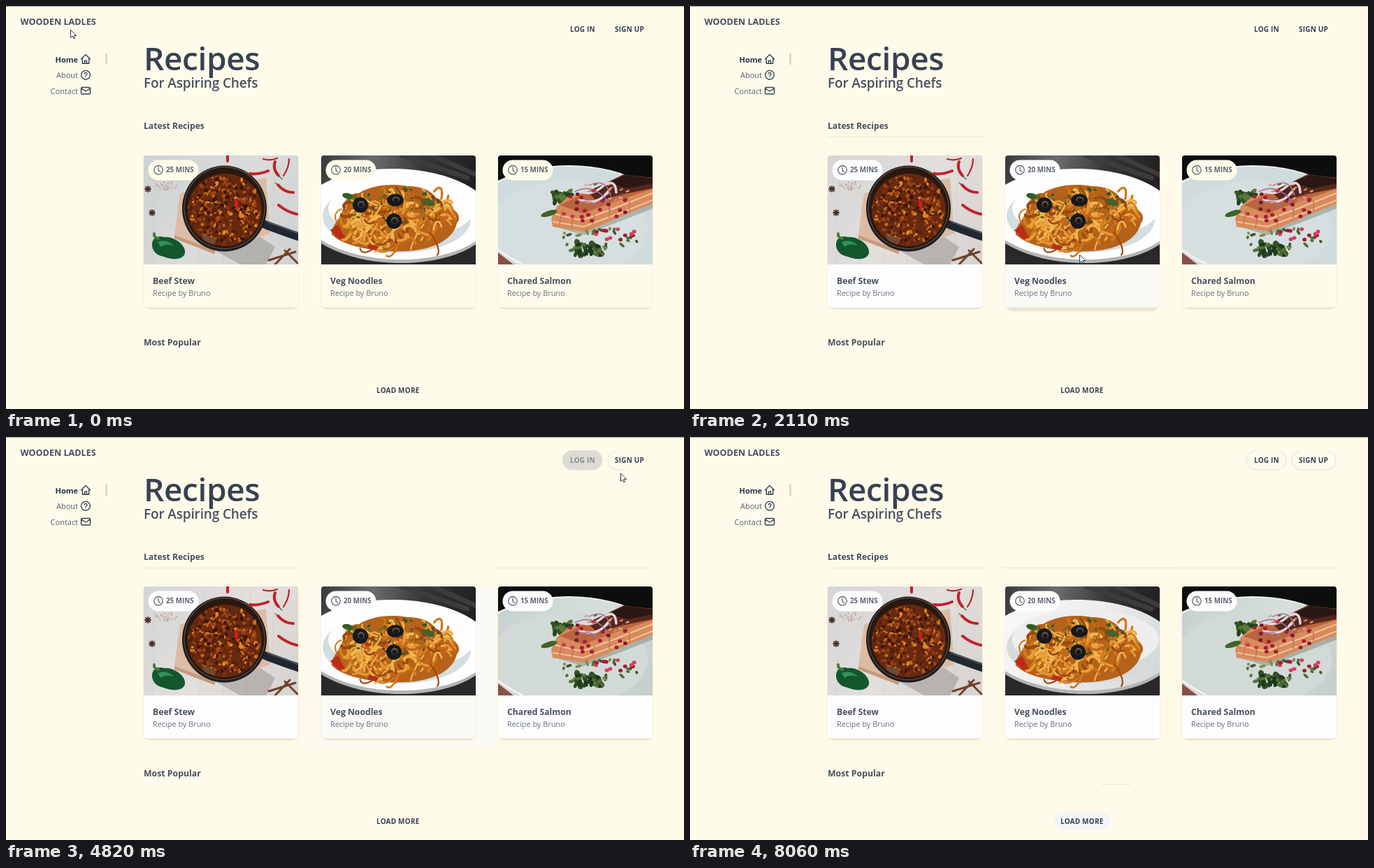
Animation of 970x577 px, one loop 8.61 s. Source, as an HTML page with a canvas:

```html
<!DOCTYPE html>
<html lang="en">
<head>
<meta charset="utf-8">
<title>Recipes</title>
<style>
html, body { margin: 0; width: 100%; height: 100%; overflow: hidden; background: #fffbeb; }
canvas { display: block; }
</style>
</head>
<body>
<canvas id="stage" width="970" height="577"></canvas>
<script>
const LOOP = 8610;
const PAGE = '#fffbeb', INK = '#374151', SOFT = '#5b6472', HEADING = '#465060';
const PHOTO_W = 221, PHOTO_H = 156, CARD_Y = 214, CARD_H = 218;
const stage = document.getElementById('stage').getContext('2d');

// ---- drawing helpers ----
function fill(g, color, path) {
  g.fillStyle = color;
  g.fill(new Path2D(path));
}

function line(g, color, width, path) {
  g.strokeStyle = color;
  g.lineWidth = width;
  g.lineCap = g.lineJoin = 'round';
  g.stroke(new Path2D(path));
}

function blob(g, color, x, y, rx, ry = rx, turn = 0) {
  g.fillStyle = color;
  g.beginPath();
  g.ellipse(x, y, rx, ry, turn, 0, Math.PI * 2);
  g.fill();
}

function ring(g, color, width, x, y, r) {
  g.strokeStyle = color;
  g.lineWidth = width;
  g.beginPath();
  g.arc(x, y, r, 0, Math.PI * 2);
  g.stroke();
}

function box(g, color, x, y, w, h, r = 0) {
  g.fillStyle = color;
  g.beginPath();
  g.roundRect(x, y, w, h, r);
  g.fill();
}

function text(str, x, y, size, weight = 600, color = INK, { spacing = 0, align = 'left' } = {}) {
  stage.font = `${weight} ${size}px "Open Sans", "Noto Sans", sans-serif`;
  stage.letterSpacing = spacing + 'px';
  stage.textAlign = align;
  stage.fillStyle = color;
  stage.fillText(str, x, y);
}

function shade(g, x0, y0, x1, y1, ...colors) {
  const gradient = g.createLinearGradient(x0, y0, x1, y1);
  colors.forEach((c, i) => gradient.addColorStop(i / (colors.length - 1), c));
  return gradient;
}

function seeded(seed) {
  return () => (seed = (seed * 16807) % 2147483647) / 2147483647;
}

function scatter(count, cx, cy, rx, ry, random, draw) {
  for (let i = 0; i < count; i++) {
    const a = random() * Math.PI * 2, d = Math.sqrt(random());
    draw(cx + Math.cos(a) * d * rx, cy + Math.sin(a) * d * ry);
  }
}

// ---- photos, in stage coordinates ----
function stew(g, fine) {
  const random = seeded(41), pick = list => list[Math.floor(random() * list.length)];
  g.fillStyle = fine ? shade(g, 197, 214, 418, 370, '#d5d5d4', '#e2dfdd', '#d5d2cf')
                     : shade(g, 197, 214, 418, 370, '#cdd2d2', '#dadbda', '#cfd2d1');
  g.fillRect(197, 214, 221, 156);
  for (let x = 214; x < 418; x += 34) line(g, 'rgba(190,190,188,.3)', 1, `M${x} 214L${x - 5} 370`);
  fill(g, 'rgba(130,122,116,.4)', 'M290 345L335 370H372L385 345L360 328Z');
  fill(g, '#dcbba3', 'M249 268L372 246L378 326L300 350L241 328Z');
  fill(g, '#c69a7b', 'M241 328L300 350L298 355L241 333Z');
  line(g, '#20272e', 12, 'M371 313C387 319 400 324 424 332');
  line(g, '#4b555e', 2, 'M374 309C390 315 402 319 422 327');
  blob(g, '#1e1d1e', 312.5, 290, 60.5, 61.5);
  blob(g, '#5e5853', 312.5, 289, 58, 59);
  blob(g, '#2a1710', 312.5, 289, 57, 58);
  blob(g, '#66290f', 313, 292, 53, 52);
  scatter(330, 313, 292, 51, 50, random, (x, y) =>
    blob(g, pick(['#43190f', '#7d3013', '#a84817', '#e0881f', '#54200f', '#96401a', '#3a140c', '#c96a1a']),
      x, y, 1.3 + random() * 2.6, 1.2 + random() * 1.6, random() * 3));
  line(g, '#d51d1a', 3.5, 'M328 278Q331 284 330 290');
  blob(g, '#6d4a37', 290, 334, 10, 4.5, .4);
  fill(g, '#14572f', 'M209 343C208 331 219 328 226 331C238 329 258 341 256 354C253 365 235 363 226 359C215 357 210 351 209 343Z');
  fill(g, '#31935a', 'M217 338Q230 333 240 343Q228 339 221 345Z');
  line(g, '#477d35', 4, 'M218 333Q211 331 212 326');
  line(g, '#c0222a', 4, 'M349 240Q360 242 375 236M385 223Q381 233 390 243M389 256Q398 267 411 267M390 285Q402 295 416 298M317 214L317 222');
  line(g, '#b5252b', 2.2, 'M397 243Q405 231 405 219M368 219Q378 222 388 218');
  line(g, '#5d7541', 1.5, 'M346 239l-5 -3M390 243l5 5M385 253l4 3');
  line(g, '#70412d', 3, 'M376 364L414 352M385 370L406 348M399 350L417 368');
  for (const [x, y] of [[203, 262], [209, 296]])
    line(g, '#4b302a', 1.8, `M${x - 4} ${y}h8M${x} ${y - 4}v8M${x - 3} ${y - 3}l6 6M${x + 3} ${y - 3}l-6 6`);
  scatter(45, 230, 257, 17, 7, random, (x, y) => blob(g, '#b99384', x, y, .8));
}

function noodles(g, fine) {
  const random = seeded(77), pick = list => list[Math.floor(random() * list.length)];
  g.fillStyle = shade(g, 451, 214, 672, 240, '#3a3a3a', '#6c6c6b', '#353535', '#202020');
  g.fillRect(451, 214, 221, 156);
  fill(g, '#292929', 'M451 335H672V370H451Z');
  line(g, '#3c3c3c', 7, 'M610 214L680 245M566 214L660 246');
  blob(g, '#b2b4b5', 559, 302, 136, 66, .03);
  blob(g, fine ? shade(g, 451, 235, 672, 365, '#f9f9f9', '#ececed', '#d2d4d6') : '#fefefe', 559, 298, 136, 65, .03);
  blob(g, fine ? '#d7dadb' : '#d4dddf', 559, 303, 106, 50, .03);
  blob(g, fine ? '#eeeeee' : '#fdfdfd', 566, 290, 105, 43);
  fill(g, '#b5621a', 'M466 327C465 314 480 304 482 290C484 278 492 267 505 268C520 258 548 253 574 258C600 258 615 268 618 282C640 286 655 300 645 311C640 334 612 349 572 351C537 353 484 346 466 327Z');
  const tones = ['#e9a036', '#d17a1c', '#f0b850', '#99490f', '#c2671a', '#e3983a', '#f0ae48'];
  scatter(170, 558, 307, 78, 38, random, (x, y) => {
    const start = random() * 6;
    g.strokeStyle = pick(tones);
    g.lineWidth = 2 + random() * 2.4;
    g.beginPath();
    g.ellipse(x, y, 8 + random() * 16, 4 + random() * 8, random() * 3, start, start + 2);
    g.stroke();
  });
  fill(g, '#bb2b18', 'M464 321L475 313L485 332L477 334Z');
  fill(g, '#b92e17', 'M520 341l14 3l-5 6l-12 -3Z');
  scatter(44, 552, 284, 70, 28, random, (x, y) =>
    blob(g, pick(['#356024', '#4d752d', '#274d20']), x, y, 2.6, 1.3, random() * 3));
  blob(g, '#365c28', 489, 272, 8, 4, .2);
  blob(g, '#47622a', 604, 281, 10, 5, .3);
  for (const [x, y, rx, ry] of [[507, 285, 11, 11], [557, 278, 12, 9], [555, 308, 11, 11]]) {
    blob(g, '#17181b', x, y, rx, ry);
    blob(g, '#5c5856', x + 1, y - 1, rx * .45, ry * .45);
    blob(g, '#18181a', x + 1, y, rx * .32, ry * .32);
  }
}

function salmon(g, fine) {
  const random = seeded(29), pick = list => list[Math.floor(random() * list.length)];
  g.fillStyle = '#0c0e0d';
  g.fillRect(704, 214, 221, 156);
  blob(g, '#eef0ee', 805, 321, 156, 93);
  blob(g, fine ? shade(g, 704, 230, 925, 370, '#c5d0ce', '#d7dfdc', '#c2cecb') : '#cfdbdd', 807, 321, 154, 91);
  blob(g, fine ? '#d2dad7' : '#d6dfe0', 805, 318, 113, 67);
  fill(g, '#8a4f48', 'M704 353L726 370H704Z');
  line(g, '#f3f2ed', 3, 'M704 349Q720 361 738 369');
  fill(g, 'rgba(110,112,98,.4)', 'M785 316L826 328L890 304L925 290V283L850 300Z');
  scatter(26, 794, 272, 16, 11, random, (x, y) =>
    blob(g, pick(['#2f5325', '#5d7837', '#23421f']), x, y, 5, 3, random() * 3));

  // fish: flaky front, then the seared crust
  fill(g, '#d88b5c', 'M780 304L788 287L803 274L836 264L884 242L925 246V283L890 297L829 323L782 316Z');
  fill(g, '#b9653f', 'M792 285L836 264L884 242L925 246V262L868 281L826 297Z');
  fill(g, '#55271d', 'M832 266L884 241L925 246V261L880 270L846 280Z');
  fill(g, '#2b1714', 'M862 253L886 242L925 247V254L890 261Z');
  line(g, '#f3c39b', 2, 'M786 298L824 307L872 289L925 268M783 309L826 316L880 296L925 278');
  line(g, '#c4744c', 1.5, 'M796 292l-4 20M812 300l-3 17M842 299l-2 13M864 291l-1 12M892 280l0 13');
  scatter(24, 855, 268, 50, 16, random, (x, y) =>
    blob(g, pick(['#8c4029', '#e5a47a', '#3a1c17', '#c98a6b']), x, y, 3, 1.3, -.4));

  line(g, '#e6d5df', 3.5, 'M818 263Q836 275 855 257Q872 246 873 267M821 277Q845 287 861 266');
  line(g, '#a377a0', 1.6, 'M814 266Q834 255 852 270Q866 282 862 292M834 257Q858 245 865 271M818 283Q834 275 846 287');
  blob(g, '#40632d', 777, 297, 12, 4, -.3);
  scatter(26, 850, 334, 62, 18, random, (x, y) =>
    blob(g, pick(['#547139', '#3c5a2e', '#7c8c50']), x, y, 2 + random() * 3, 2, random() * 3));
  line(g, '#34502a', 8, 'M817 338L822 357M838 340L852 355');
  scatter(30, 830, 350, 24, 11, random, (x, y) =>
    blob(g, pick(['#2c4924', '#547139', '#1f361c']), x, y, 4.5, 2.5, random() * 3));
  scatter(20, 839, 288, 54, 27, random, (x, y) => blob(g, pick(['#a31d36', '#d0304e', '#82192b']), x, y, 3, 2.6));
  scatter(12, 872, 326, 32, 9, random, (x, y) => blob(g, pick(['#a31d36', '#d83c5c']), x, y, 3, 2.6));
}

function photo(paint, x, fine) {
  const canvas = document.createElement('canvas');
  canvas.width = PHOTO_W;
  canvas.height = PHOTO_H;
  const g = canvas.getContext('2d');
  g.translate(-x, -CARD_Y);
  paint(g, fine);
  return canvas;
}

// "fresh" is the time from which a card is white and its photo smooth
const cards = [
  { x: 197, title: 'Beef Stew', mins: 25, paint: stew, tint: 930, fresh: 930, hovers: [[930, 1620]] },
  { x: 451, title: 'Veg Noodles', mins: 20, paint: noodles, tint: 1830, fresh: 5660, hovers: [[1830, 2300], [5660, 6000]] },
  { x: 704, title: 'Chared Salmon', mins: 15, paint: salmon, tint: 2350, fresh: 3230, hovers: [[2350, 3230]] },
];
for (const card of cards) card.photos = [false, true].map(fine => photo(card.paint, card.x, fine));

// ---- timing ----
const clamp = v => Math.max(0, Math.min(1, v));
const pulse = (t, from, to, fade = 240) => Math.min(clamp((t - from) / fade), 1 - clamp((t - to) / fade));

// Pointer moves: first step, last step, number of steps, end point, shape
const moves = [
  [0, 0, 1, 92, 34, 'arrow'], [120, 240, 2, 115, 28, 'arrow'], [390, 390, 1, 186, 20, 'arrow'],
  [540, 790, 3, 237, 168, 'arrow'], [930, 1410, 5, 375, 335, 'arrow'], [1560, 1560, 1, 426, 349, 'arrow'],
  [1680, 1680, 1, 463, 347, 'arrow'], [1830, 1830, 1, 505, 346, 'arrow'], [2110, 2590, 5, 763, 396, 'beam'],
  [2960, 2960, 1, 763, 392, 'beam'], [3080, 3080, 1, 770, 368, 'arrow'], [3230, 3830, 6, 821, 56, 'arrow'],
  [3980, 4340, 4, 826, 36, 'hand'], [4580, 4820, 3, 879, 52, 'arrow'], [4940, 5420, 5, 890, 36, 'hand'],
  [5540, 5900, 4, 618, 420, 'arrow'], [6050, 6170, 2, 607, 493, 'arrow'], [6320, 6320, 1, 589, 521, 'arrow'],
  [6470, 6470, 1, 573, 543, 'arrow'], [6620, 6890, 3, 568, 547, 'hand'], [7040, 7290, 3, 641, 562, 'arrow'],
  [7440, 7560, 2, 642, 580, 'arrow'],
];

function pointerAt(t) {
  const i = moves.findLastIndex(m => t >= m[0]);
  const [from, to, steps, x, y, shape] = moves[i];
  const [, , , px, py, before] = moves[Math.max(0, i - 1)];
  const gap = (to - from) / Math.max(1, steps - 1) || 1;
  const done = Math.min(steps, Math.floor((t - from) / gap + 1e-6) + 1) / steps;
  const kind = shape === 'arrow' || done === 1 ? shape : before === 'hand' ? 'hand' : 'arrow';
  return { x: Math.round(px + (x - px) * done), y: Math.round(py + (y - py) * done), kind };
}

// ---- page parts ----
function drawPointer(t) {
  const { x, y, kind } = pointerAt(t), g = stage;
  g.save();
  g.translate(x + .5, y + .5);
  if (kind === 'beam') {
    line(g, '#333', 1, 'M-3 -6H-1M1 -6H3M0 -5V5M-3 6H-1M1 6H3');
  } else {
    const path = kind === 'hand'
      ? 'M-1 0Q0 -2 1 0V5L6 6V11L4 14H-2L-5 9Q-5 6 -1 9Z'
      : 'M0 0V11L2.6 8.6L4.4 12.4L6 11.6L4.4 8H7.8Z';
    fill(g, '#fff', path);
    line(g, '#333942', 1, path);
  }
  g.restore();
}

function drawNav() {
  const g = stage, right = { align: 'right' };
  text('WOODEN LADLES', 20.5, 26.5, 12.6, 700, HEADING);
  text('Home', 103, 80.5, 11, 700, '#293241', right);
  text('About', 103, 103, 11, 400, '#566071', right);
  text('Contact', 103, 126, 11, 400, '#566071', right);
  line(g, INK, 1.4, 'M107.5 76L114 69.5L120.5 76M109.3 75V82.3H118.7V75M112.5 82V78.3H115.5V82');
  ring(g, INK, 1.4, 114, 98.8, 6.4);
  line(g, INK, 1.3, 'M112 97.2Q112.4 95.4 114 95.4Q116 95.5 116 97.2Q115.9 98.4 114.1 99.3V100M114 102v.1');
  line(g, INK, 1.4, 'M109 116.5H119Q120.5 116.5 120.5 118V124.5Q120.5 126 119 126H109Q107.5 126 107.5 124.5V118Q107.5 116.5 109 116.5M107.8 118L114 122L120.2 118');
  box(g, '#ead5cb', 142, 68, 3, 16);
}

function drawTints(t) {
  const g = stage;
  if (t >= 930) box(g, '#fefae8', 192, 169, 230, 274);
  if (t >= 2230) {
    box(g, '#fbf9f4', 446, 215, t < 3230 ? 484 : 254, 229);
    if (t >= 3230) box(g, '#fefae8', 700, 169, 226, 274);
  }
  if (t >= 5660) box(g, '#fefae8', 446, 188, 254, 255);
  const rule = '#ece8da';
  if (t >= 930) box(g, rule, 197, 187, 225, 1);
  if (t >= 3230) box(g, rule, 700, 187, 225, 1);
  if (t >= 5660) box(g, rule, 446, 187, 254, 1);
  if (t >= 6170) box(g, rule, 588, 497, 43, 1);
}

function drawCard(card, t) {
  const g = stage, { x } = card, fresh = t >= card.fresh;
  const lift = Math.max(...card.hovers.map(([a, b]) => pulse(t, a, b)));
  box(g, '#ece5d3', x + 1.5 + lift, 400, PHOTO_W - 3 - 2 * lift, 34.5 + 2.5 * lift, 7);
  box(g, '#ebe6d8', x - .5, CARD_Y, PHOTO_W + 1, CARD_H + .5, 4);
  const paper = fresh ? '#fdfdfd' : t >= card.tint ? '#faf9f6' : PAGE;
  box(g, paper, x, CARD_Y, PHOTO_W, CARD_H - .5, 4);
  g.save();
  g.beginPath();
  g.roundRect(x, CARD_Y, PHOTO_W, PHOTO_H, [4, 4, 0, 0]);
  g.clip();
  g.drawImage(card.photos[+fresh], x, CARD_Y);
  g.restore();
  box(g, t >= card.tint ? '#fdfdfd' : PAGE, x + 6.5, 220.5, 72, 29, 14.5);
  ring(g, SOFT, 1.3, x + 21, 234.8, 6.3);
  line(g, SOFT, 1.3, `M${x + 21} 231V235L${x + 23.5} 237.2`);
  text(card.mins + ' MINS', x + 32, 237.5, 9.8, 700, SOFT);
  text(card.title, x + 13, 397.5, 12.2, 700, HEADING);
  text('Recipe by Bruno', x + 13, 415, 10.9, 400, '#687181');
}

function drawPill(x, y, w, h, color, level) {
  stage.globalAlpha = level;
  box(stage, color, x, y, w, h, h / 2);
  stage.globalAlpha = 1;
}

function drawOutline(x, w, visible) {
  const g = stage;
  g.save();
  g.beginPath();
  g.rect(x - 1, 20, visible, 30);
  g.clip();
  g.strokeStyle = '#dcdee5';
  g.lineWidth = 1;
  g.beginPath();
  g.roundRect(x, 19.5, w, 27.5, 13.75);
  g.stroke();
  g.restore();
}

function drawButtons(t) {
  const caps = { spacing: .2 };
  const login = pulse(t, 3860, 4820, 360), signup = pulse(t, 4940, 5480, 300);
  drawPill(796, 19, 57, 28, '#dddcd3', login);
  drawPill(861, 19, 63, 28, '#dddcd3', signup);
  if (t >= 4100) drawOutline(796, 57, 60);
  if (t >= 4820) drawOutline(861, 63, t < 4940 ? 26 : 66);
  text('LOG IN', 807, 37, 10, 700, login > .5 ? '#858b91' : INK, caps);
  text('SIGN UP', 871, 37, 10, 700, signup > .5 ? '#858b91' : INK, caps);

  const press = pulse(t, 6500, 7040, 360);
  if (t >= 6890) drawPill(521, 537.5, 80, 25, '#f3f4f6', 1);
  drawPill(521 - 2 * press, 537.5 - 2 * press, 80 + 2 * press, 25 + 4 * press, '#e7e9eb', press);
  text('LOAD MORE', 530, 553.5, 10, 700, INK, caps);
}

function draw(t) {
  box(stage, PAGE, 0, 0, 970, 577);
  box(stage, '#aaa89f', 0, 0, 970, 1);
  drawTints(t);
  drawNav();
  text('Recipes', 197, 92, 46, 600, INK, { spacing: -.4 });
  text('For Aspiring Chefs', 197, 117, 19, 600, HEADING, { spacing: -.15 });
  text('Latest Recipes', 197, 176, 12.1, 700, HEADING);
  text('Most Popular', 197, 485.5, 12.3, 700, HEADING);
  for (const card of cards) drawCard(card, t);
  drawButtons(t);
  drawPointer(t);
}

const started = performance.now();
function tick() {
  draw((performance.now() - started) % LOOP);
  requestAnimationFrame(tick);
}
tick();
</script>
</body>
</html>
```
